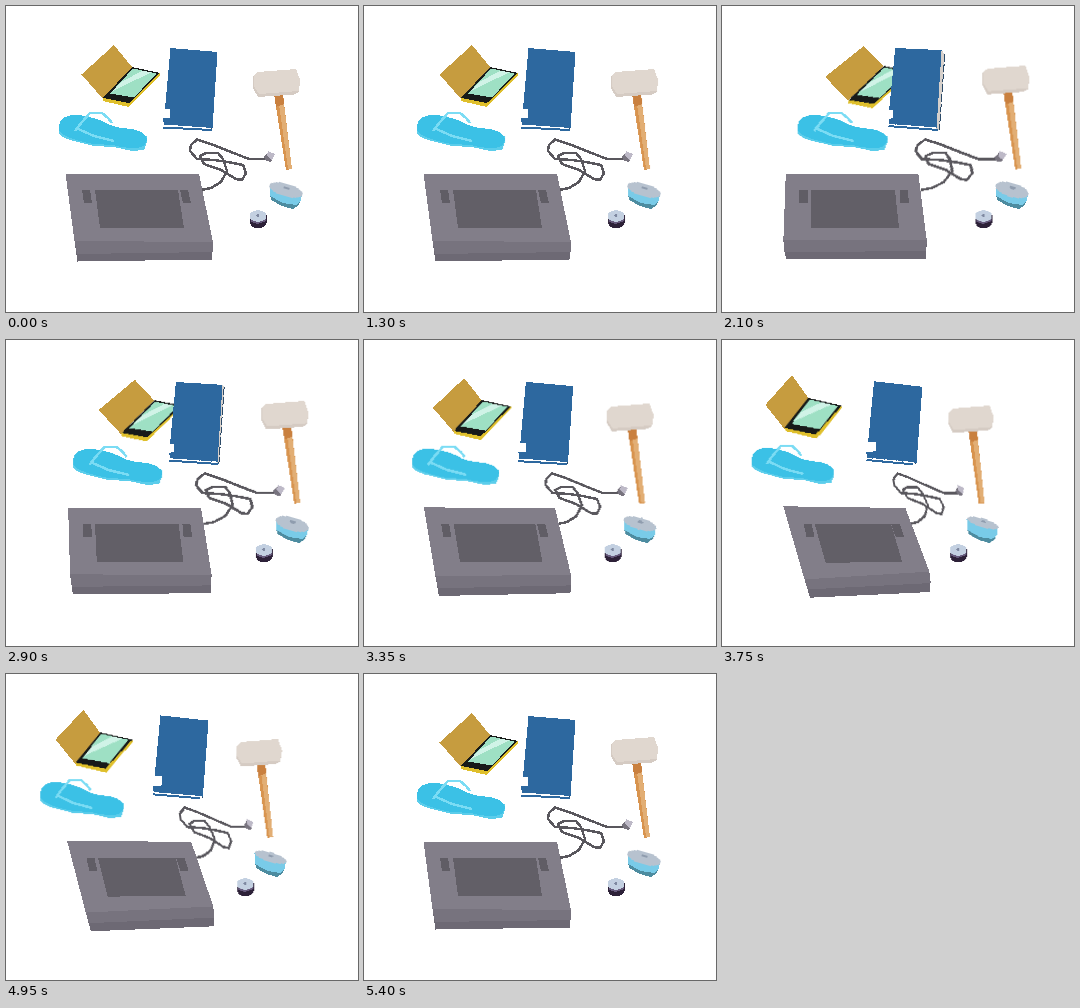
An HTML page without scripts that plays this animation: 352x306 px, repeating every 5.45 s.

```html
<!DOCTYPE html>
<html lang="en">
<head>
<meta charset="utf-8">
<title>Objects on a table</title>
<style>
html, body { margin: 0; width: 100%; height: 100%; overflow: hidden; background: #fff; }
svg { display: block; width: 100%; height: 100%; shape-rendering: crispEdges; }

/* The view rests, swings right, then left, and returns.
   --a: rest pose, --r: right pose, --l: left pose */
.morph { d: var(--a); animation: morph 5.45s linear infinite; }
.move { --a: matrix(1, 0, 0, 1, 0, 0); animation: move 5.45s linear infinite; }
@keyframes morph {
  0%, 99.083%, 100% { d: var(--a); }
  23.853% { d: var(--a); animation-timing-function: cubic-bezier(.39, .575, .565, 1); }
  43.119% { d: var(--r); animation-timing-function: cubic-bezier(.435, 0, .61, .425); }
  59.633% { d: var(--a); animation-timing-function: cubic-bezier(.39, .575, .565, 1); }
  77.982% { d: var(--l); animation-timing-function: cubic-bezier(.435, 0, .61, .425); }
}
@keyframes move {
  0%, 99.083%, 100% { transform: var(--a); }
  23.853% { transform: var(--a); animation-timing-function: cubic-bezier(.39, .575, .565, 1); }
  43.119% { transform: var(--r); animation-timing-function: cubic-bezier(.435, 0, .61, .425); }
  59.633% { transform: var(--a); animation-timing-function: cubic-bezier(.39, .575, .565, 1); }
  77.982% { transform: var(--l); animation-timing-function: cubic-bezier(.435, 0, .61, .425); }
}

#cover {
  --a: path("M75.5 68.5L108 39L126 61L97 93Z");
  --r: path("M104.7 71L143.3 40.2L163.6 60L127.5 95Z");
  --l: path("M31.8 63.6L56.5 33.7L73.6 59L51 88.6Z");
}
#phone { --r: matrix(.998, -.049, -.211, 1.057, 50.8, 1.6); --l: matrix(1.172, .0775, .406, 1.037, -100.4, -15.3); }
#sandal { --r: matrix(1.022, 0, 0, 1, 22.7, 0); --l: matrix(.914, 0, 0, 1, -27, -1.5); }
#cable { --r: matrix(1.086, 0, -.18, 1, 20.4, 0); --l: matrix(.755, 0, .24, 1, -6.1, 0); }
#mallet { --r: matrix(1, 0, 0, 1.03, 14, -5.5); --l: matrix(.94, 0, -.018, .965, -11.7, 5.7); }
#tin { --r: matrix(1, 0, 0, 1, 10.5, 0); --l: matrix(.94, 0, 0, 1, -9.5, 0); }
#lid { --r: matrix(1, 0, 0, 1.1, 0, 0); --l: matrix(1, 0, 0, .55, 0, -1.5); }
#spool { --r: matrix(1, 0, 0, 1, 10, 0); --l: matrix(1, 0, 0, 1, -21.5, 0); }

#pages {
  --a: path("M211 46L211 46L206 124L206 124Z");
  --r: path("M219.6 44L223.5 48L218 124L214.5 123Z");
  --l: path("M196 47L196 47L190 124L190 124Z");
}
#edge {
  --a: path("M210.5 46L205.5 124");
  --r: path("M223.5 48L218 124");
  --l: path("M195.5 47L189.5 124");
}
#back {
  --a: path("M157 121.5L206 124");
  --r: path("M167 120L217 124");
  --l: path("M140 119.5L186 124.5");
}
#gap {
  --a: path("M158 119.5L205 122.5");
  --r: path("M168 118.5L215 122");
  --l: path("M141 118L187 122.5");
}
#front {
  --a: path("M164.5 42L211.5 46L206.5 122L158 118.5L157 112.5L164 112L164 103L159 103Z");
  --r: path("M173.7 42L220 44L215 122L167.7 118L167.7 113L171.5 112L171.5 104L167.6 104Z");
  --l: path("M147.6 41L196.4 47L190.3 123L141 118.5L139.5 112L151 111L151 102L141.5 102Z");
}

#base {
  --a: path("M68.5 235L207 236L206 253.5L71.5 255.5Z");
  --r: path("M61 234L204.6 234L204 253L63.5 253.3Z");
  --l: path("M87.5 241L207.5 230L209 251.5L94 258.5Z");
}
#band {
  --a: path("M68.5 235L207 236L206.5 246L71 248Z");
  --r: path("M61 234L204.6 234L204 245L62 246Z");
  --l: path("M87.5 241L207.5 230L209.5 242L91 250Z");
}
#top {
  --a: path("M59.5 167.7L193 168L207 236L68.500 235Z");
  --r: path("M64 168L196.5 168L204.6 234L61 234Z");
  --l: path("M62 165.8L180 168L207.5 230L87.5 241Z");
}
#pad {
  --a: path("M89 184L172 184L178 222L94 222Z");
  --r: path("M89 184L173 184L177 222L88.6 222Z");
  --l: path("M94 184L168 184L181 222L107 223Z");
}
#keys {
  --a: path("M76 184L84 184L86 197L78 197ZM174 184L182 184L185 197L177 197Z");
  --r: path("M77 184L86 184L86 197L77 197ZM178 184L186 184L187 197L178 197Z");
  --l: path("M83.5 184L91.5 184L95 197L87 197ZM167.5 184L176.5 184L181 197L172.5 197Z");
}
</style>
</head>
<body>
<svg viewBox="0 0 352 306">
  <path id="cover" class="morph" fill="#c69c3f"/>
  <g id="phone" class="move">
    <path fill="#dfbf2b" d="M97 92L126 61L154 67L154 69L123 101L97 95Z"/>
    <path fill="#171a19" d="M97 92L126 61L154 67L123 97Z"/>
    <path fill="#9ee0c4" d="M104 87.500L127 62.500L150.500 67.500L128 91.500Z"/>
    <path fill="#d0f3e7" d="M106.500 85L115 76L137 64.500L145 66.500Z"/>
  </g>

  <g id="sandal" class="move">
    <path fill="#5bcdeb" d="M53 122L53 128Q60 134 72 136L88 140L108 141L126 145L138 144L141 136V130Z"/>
    <path fill="#3bc1e6" d="M53 122Q53 114 59 111Q67 107 83 111Q94 113 104 119Q112 122 126 123Q140 126 141 133Q140 142 129 142Q117 142 107 139L88 138Q60 133 53 125Z"/>
    <g fill="none" stroke="#7bdcf4" stroke-width="2.500">
      <path d="M69 125L76 116L84 107L96 107L102 112L106 117"/>
      <path d="M70 122L88 130L108 135"/>
    </g>
  </g>

  <path id="pages" class="morph" fill="#d6d0cb"/>
  <path id="edge" class="morph" fill="none" stroke="#2c4a68" stroke-dasharray="8 2"/>
  <path id="front" class="morph" fill="#2d689f"/>
  <path id="back" class="morph" fill="none" stroke="#2d689f" stroke-width="2"/>
  <path id="gap" class="morph" fill="none" stroke="#fff" stroke-width="1.200" stroke-dasharray="5 1"/>

  <g id="cable" class="move">
    <path fill="none" stroke="#59575d" stroke-width="2.500" stroke-linejoin="round" d="M262 153L243 153L225 146L205 138L191 133.500L185 139L184 145L191 153L208 154L222 156L237 159L240 167L236 174L230 173L215 164L198 158L194 150L200 147L212 147L217 153L221 165L215 176L205 182L195 184"/>
    <path fill="#77737e" d="M258 151L262 146L269 148L265 156L260 155Z"/>
    <path fill="#bdb9c7" d="M262 145L269 148L266 154L261 150Z"/>
  </g>

  <path id="base" class="morph" fill="#6d6974"/>
  <path id="band" class="morph" fill="#77737e"/>
  <path id="top" class="morph" fill="#827e89"/>
  <path id="pad" class="morph" fill="#625f67"/>
  <path id="keys" class="morph" fill="#605d65"/>

  <g id="mallet" class="move">
    <path fill="#d8944f" d="M268 88L277 88L286 163L280 164Z"/>
    <path fill="#e2ae74" d="M273 98L278 98L286 163L282 163Z"/>
    <path fill="#c9803f" d="M268 88L277 88L278 98L270 101Z"/>
    <path fill="#d5cbc3" d="M247.500 70L252 66L290 63L294.500 75L292.500 86L288 88.500L252 91L247 82Z"/>
    <path fill="#e0d7cf" d="M247.500 70L252 66L290 63L294.500 75L292.500 85L253 88L247.500 80Z"/>
  </g>

  <g id="tin" class="move">
    <path fill="#4d8ca0" d="M264 187L295 193L293 199L287 203L276 200L265 194Z"/>
    <path fill="#79cbe8" d="M263.500 179L296 187L295 195L290 199L277 197L264 190Z"/>
    <g transform="translate(280 184) rotate(16)">
      <g id="lid" class="move">
        <ellipse rx="17" ry="6.500" fill="#b7c2cf"/>
        <ellipse cy="-2" rx="3" ry="1.500" fill="#8f9cae"/>
      </g>
    </g>
  </g>

  <g id="spool" class="move">
    <path fill="#2d2138" d="M243.500 209H260.500V217Q259 222 252 222Q245 222 244 217Z"/>
    <path fill="#665a7c" d="M245 212L260 211V215L252 218L245 216Z"/>
    <ellipse cx="252" cy="210" rx="8.500" ry="5.800" fill="#c3d0e1"/>
    <circle cx="252" cy="209.500" r="1.500" fill="#7e88a0"/>
  </g>
</svg>
</body>
</html>
```
